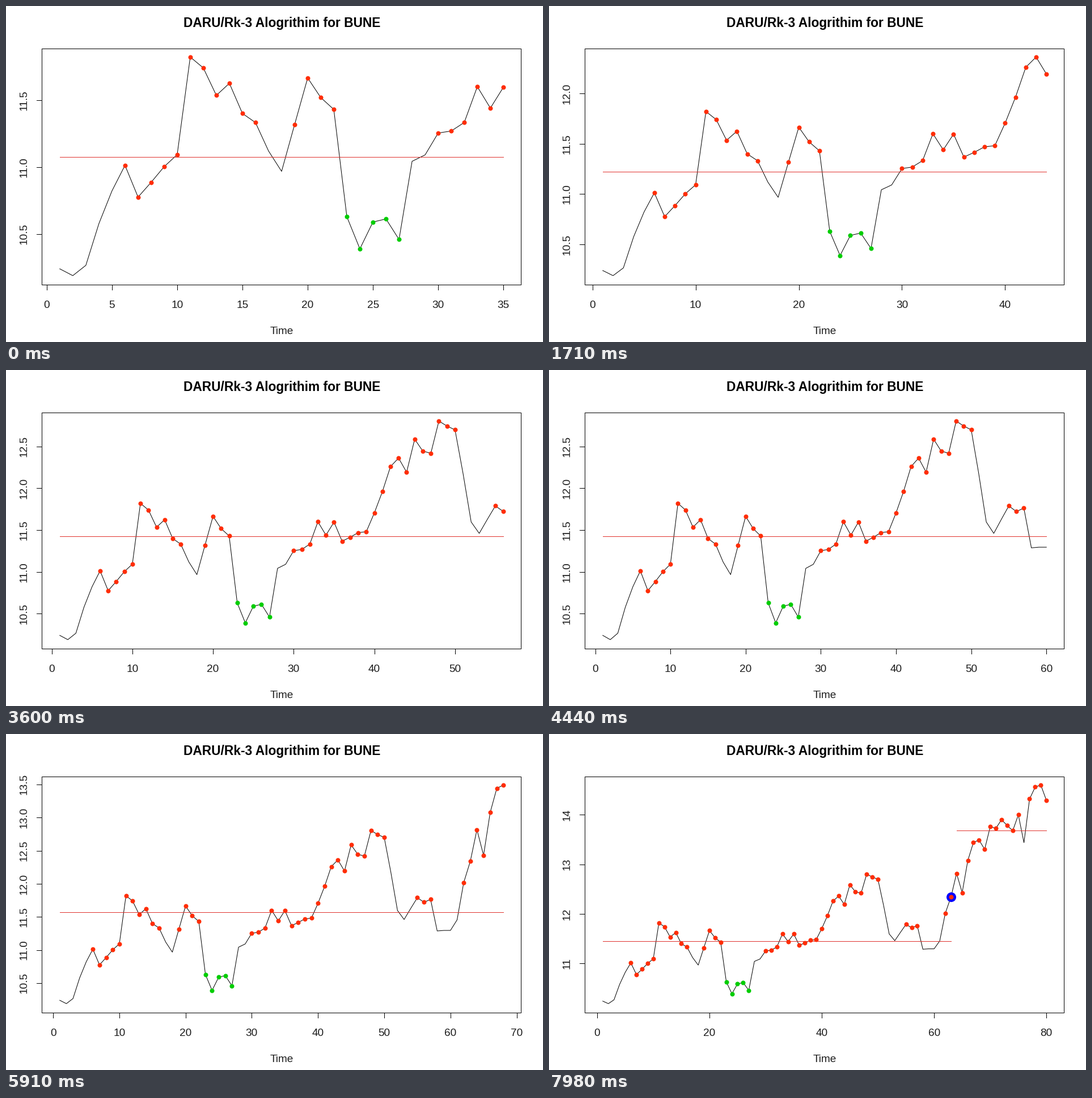
Animation, 947 px wide and 592 px high, one loop 8 s. Source, as a matplotlib script:

```python
import math

import matplotlib.pyplot as plt
import numpy as np
from matplotlib.animation import FuncAnimation

WIDTH, HEIGHT, DPI = 947, 592, 64
PX = 72 / DPI                      # one pixel in points
LEFT, RIGHT, TOP, BOTTOM = 63, 908, 74, 490
LOOP, FRAMES = 8000, 200
RED, GREEN, BLUE, MEAN = "#ff2d05", "#00cd00", "#0000ff", "#e0332e"
INK = "#1c1c1c"

PRICES = np.array([
    10.241, 10.190, 10.267, 10.578, 10.822, 11.013, 10.776, 10.886, 11.003, 11.093,
    11.821, 11.740, 11.535, 11.625, 11.400, 11.332, 11.120, 10.968, 11.318, 11.665,
    11.519, 11.430, 10.630, 10.390, 10.590, 10.613, 10.460, 11.043, 11.091, 11.254,
    11.269, 11.333, 11.600, 11.440, 11.596, 11.368, 11.415, 11.470, 11.481, 11.706,
    11.962, 12.260, 12.362, 12.193, 12.588, 12.446, 12.419, 12.805, 12.745, 12.700,
    12.175, 11.598, 11.461, 11.628, 11.790, 11.722, 11.764, 11.288, 11.296, 11.296,
    11.455, 12.017, 12.341, 12.818, 12.430, 13.077, 13.442, 13.492, 13.305, 13.762,
    13.728, 13.902, 13.788, 13.679, 14.000, 13.439, 14.321, 14.561, 14.602, 14.292])
DAYS = np.arange(1, len(PRICES) + 1)
SELL = (DAYS >= 23) & (DAYS <= 27)
PLAIN = np.isin(DAYS, [*range(1, 6), 17, 18, 28, 29, *range(51, 55), *range(58, 62), 76])
BUY = ~(SELL | PLAIN)
BREAK, BREAK_SEEN = 63, 70         # change point and the day it is detected

# Pace at which new days arrive: (ms, day)
PACE = [(0, 35), (810, 40), (930, 40), (1080, 41), (1560, 44), (1710, 45),
        (2280, 48), (2760, 48), (2910, 49), (3000, 50), (3150, 51), (3450, 55),
        (3600, 56), (3930, 58), (4110, 59), (6450, 72), (6690, 73), (7560, 78),
        (7920, 80), (8000, 80)]


def tick_step(span):
    cell = span / 5
    base = 10 ** math.floor(math.log10(cell))
    step = base
    for factor, bias in ((2, 0.8), (5, 1.7), (10, 0.8)):
        if factor * base - cell >= bias * (cell - step):
            break
        step = factor * base
    return step


def make_scale(low, high, start, end):
    """Return the pixel mapping, tick values and tick step for a padded range."""
    pad = 0.04 * (high - low)
    low, high = low - pad, high + pad
    step = tick_step(high - low)
    ticks = step * np.arange(math.ceil(low / step - 1e-9), math.floor(high / step + 1e-9) + 1)
    return lambda v: start + (v - low) / (high - low) * (end - start), ticks, step


fig = plt.figure(figsize=(WIDTH / DPI, HEIGHT / DPI), dpi=DPI, facecolor="white")
ax = fig.add_axes([0, 0, 1, 1])
ax.set(xlim=(-0.5, WIDTH - 0.5), ylim=(HEIGHT - 0.5, -0.5))
ax.axis("off")
plt.rcParams["font.family"] = "Liberation Sans"


def line(x, y, color="black", width=1.0, z=2):
    return ax.plot(x, y, color=color, lw=width * PX, zorder=z, solid_joinstyle="round")[0]


def dots(x, y, color, size, z):
    return ax.plot(x, y, "o", color=color, ms=size * PX, mew=0, zorder=z)[0]


def label(x, y, text, size=19, color=INK, **kw):
    return ax.text(x, y, text, fontsize=size * PX, color=color, ha="center",
                   va="baseline", rotation_mode="anchor", **kw)


label(486, 37, "DARU/Rk-3 Alogrithim for BUNE", 22.7, "black", weight="bold")
label(485.5, 577.5, "Time")
line([LEFT, RIGHT, RIGHT, LEFT, LEFT], [TOP, TOP, BOTTOM, BOTTOM, TOP])

drawn = []


def draw_chart(n):
    days, prices = DAYS[:n], PRICES[:n]
    to_x, x_ticks, _ = make_scale(1, n, LEFT, RIGHT)
    to_y, y_ticks, y_step = make_scale(prices.min(), prices.max(), BOTTOM, TOP)
    x, y = to_x(days), to_y(prices)

    for tick in x_ticks:
        px = to_x(tick)
        yield line([px, px], [BOTTOM, BOTTOM + 9])
        yield label(px, 531.5, f"{tick:.0f}")
    for tick in y_ticks:
        py = to_y(tick)
        yield line([LEFT - 9, LEFT], [py, py])
        yield label(36.5, py, f"{tick:.{int(y_step < 1)}f}", rotation=90)

    yield line(x, y)
    split = BREAK if n >= BREAK_SEEN else n
    for first, last in ((0, split), (split, n)):
        if first < last:
            level = to_y(prices[first:last].mean())
            yield line([x[first], x[last - 1]], [level, level], MEAN, z=3)
    if split < n:
        yield dots(x[split - 1], y[split - 1], BLUE, 17, 4)
    for mask, color in ((BUY, RED), (SELL, GREEN)):
        yield dots(x[mask[:n]], y[mask[:n]], color, 8, 5)


def update(frame):
    while drawn:
        drawn.pop().remove()
    day = int(np.interp(frame * LOOP / FRAMES, *zip(*PACE)) + 1e-6)
    drawn.extend(draw_chart(day))
    return drawn


anim = FuncAnimation(fig, update, frames=FRAMES, interval=LOOP / FRAMES,
                     init_func=lambda: update(0), repeat=True, repeat_delay=0)
plt.show()
```
